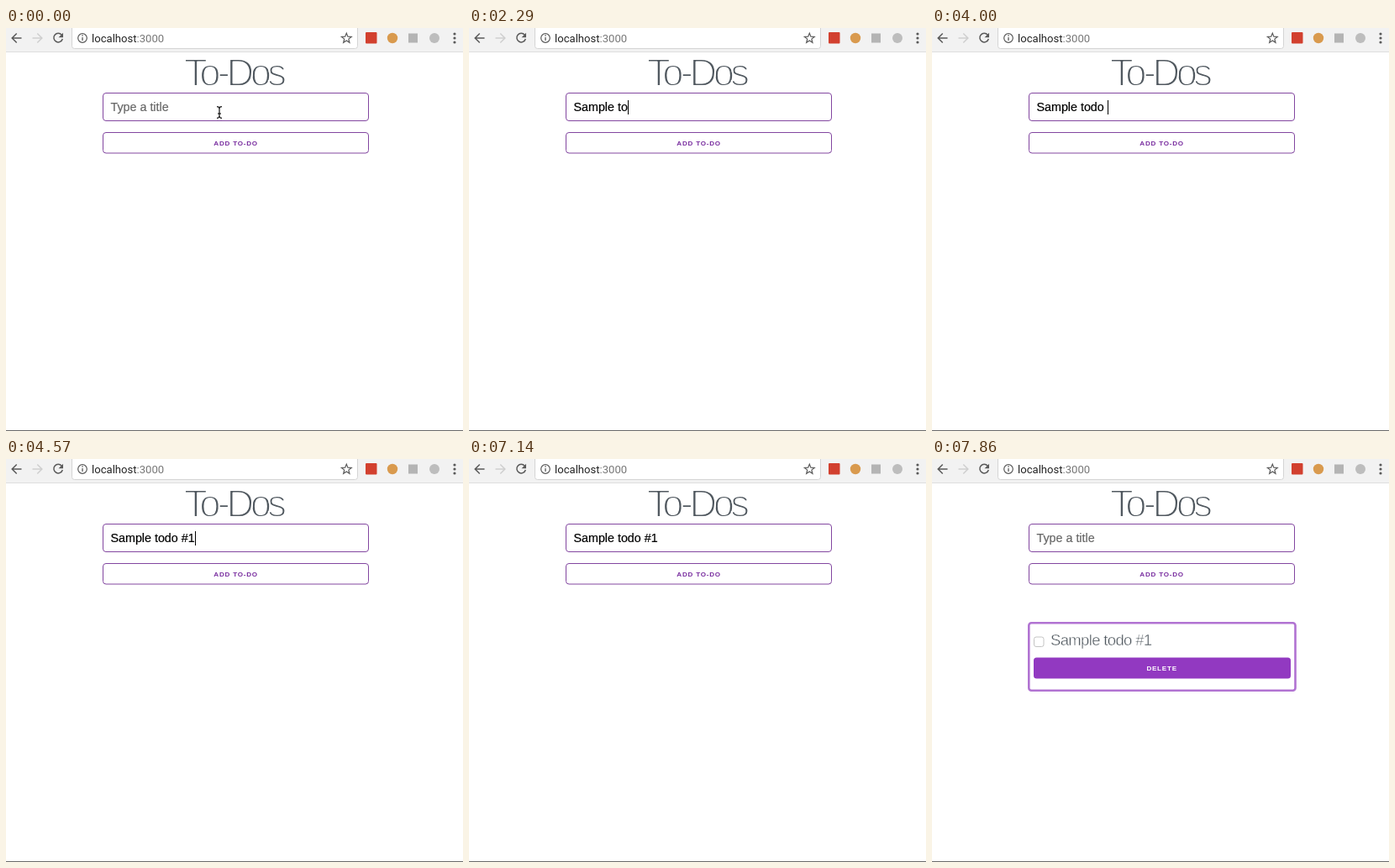
Animation, 544 px wide and 480 px high, one loop 8000 ms. Source, as an HTML page:

```html
<!DOCTYPE html>
<html lang="en">
<head>
<meta charset="utf-8">
<title>To-Dos</title>
<style>
  html, body { margin: 0; width: 100%; height: 100%; overflow: hidden; background: #fff; }
  svg { display: block; width: 544px; height: 480px; }
  text { font-family: "Liberation Sans", Arial, sans-serif; white-space: pre; }
  .icon { fill: none; stroke: #5a5a5a; stroke-width: 1.5; }
  .box { fill: #fff; stroke: #8246a0; }
  .field { font-size: 14.3px; stroke-width: .2; }
  .label { font-size: 8.1px; font-weight: bold; letter-spacing: .75px; fill: #7a2fa0; text-anchor: middle; }
  /* The white outline trims the regular weight down to a light one. */
  .light { fill: #50585f; stroke: #fff; stroke-linejoin: round; }
</style>
</head>
<body>
<svg viewBox="0 0 544 480">
  <rect width="544" height="480" fill="#fff"/>

  <g id="toolbar">
    <rect width="544" height="28" fill="#f2f2f2"/>
    <path d="M0 28.5H544" stroke="#dedede"/>
    <rect x="78.5" y="-6.5" width="340" height="31" rx="3" fill="#fff" stroke="#d4d4d4"/>
    <path class="icon" d="M18.5 12H7.5M12.7 6.5L7.2 12l5.5 5.5"/>
    <path class="icon" style="stroke:#cfcfcf" d="M31.5 12h11M37.3 6.5l5.5 5.5-5.5 5.5"/>
    <path class="icon" d="M66.3 8.2A5.3 5.3 0 1 0 67.3 13"/>
    <path d="M68 5.8v5.4h-5.4z" fill="#5a5a5a"/>
    <circle class="icon" cx="91" cy="12" r="5.3" style="stroke-width:1.2"/>
    <path class="icon" d="M91 11v4M91 8.3v1.5" style="stroke-width:1.3"/>
    <text x="102" y="16.6" font-size="13.1" fill="#222" style="font-family:Roboto,sans-serif">localhost<tspan fill="#777">:3000</tspan></text>
    <path id="star" class="icon" style="stroke-width:1.2"/>
    <rect x="428" y="5" width="13.5" height="13.5" rx="1" fill="#d2402f"/>
    <circle cx="460" cy="12" r="6.2" fill="#d99a4e"/>
    <rect x="479" y="6.5" width="11" height="11" fill="#b4b4b4"/>
    <circle cx="510" cy="12" r="6" fill="#bdbdbd"/>
    <g fill="#5a5a5a">
      <circle cx="534" cy="7" r="1.6"/><circle cx="534" cy="12" r="1.6"/><circle cx="534" cy="17" r="1.6"/>
    </g>
  </g>

  <text class="light" x="212" y="69" font-size="45.5" letter-spacing="-4.6" stroke-width="1.9">To<tspan dx="1">-Dos</tspan></text>

  <rect class="box" x="115.5" y="77.5" width="316" height="33" rx="3.5"/>
  <text id="placeholder" class="field" x="124.5" y="99" fill="#666" stroke="#666">Type a title</text>
  <text id="typed" class="field" x="124.5" y="99" stroke="#000"></text>
  <path id="caret" d="M.5 86v17" stroke="#000"/>
  <g id="pointer" fill="none" stroke="#222" stroke-width="1.3">
    <path d="M251 93.7q3 0 3 2.5v8.6q0 2.5-3 2.5M257 93.7q-3 0-3 2.5v8.6q0 2.5 3 2.5M252.2 102h3.6"/>
  </g>

  <rect class="box" x="115.5" y="124.5" width="316" height="24.5" rx="3.5"/>
  <text class="label" x="273.6" y="140.4">ADD TO-DO</text>

  <g id="card">
    <rect x="115.3" y="195.3" width="317.2" height="80.4" rx="3" fill="#fff" stroke="#b173d2" stroke-width="2.6"/>
    <rect x="121.5" y="212" width="11.5" height="11.5" rx="2.5" fill="#fff" stroke="#c4c4c4"/>
    <text class="light" x="141" y="222" font-size="18.5" letter-spacing="-.65" stroke-width=".45">Sample todo #1</text>
    <rect x="121" y="236.5" width="306" height="25" rx="3.5" fill="#9239c1"/>
    <text class="label" x="273.6" y="252.4" style="fill:#fff">DELETE</text>
  </g>

  <path d="M0 479.5H544" stroke="#6a6a6a"/>
</svg>
<script>
  const LOOP = 8000, POINTER_HIDES = 570, SUBMITTED = 7290;
  const TITLE = "Sample todo #1";

  // [time, characters typed, caret visible]
  const steps = [
    [0, 0, false], [290, 0, true],
    [570, 1, true], [710, 2, true], [1000, 3, true], [1140, 4, true],
    [1290, 5, true], [1430, 6, true], [1570, 7, true], [2000, 7, false],
    [2140, 8, true], [2290, 9, true], [2430, 10, true], [2570, 11, true],
    [3000, 12, true], [3570, 12, false], [4000, 12, true],
    [4290, 13, true], [4570, 14, true],
    [5000, 14, false], [5570, 14, true], [6000, 14, false],
    [6570, 14, true], [7000, 14, false],
    [SUBMITTED, 0, true], [7710, 0, false]
  ];

  const get = id => document.getElementById(id);
  const [placeholder, typed, caret, pointer, card] =
    ["placeholder", "typed", "caret", "pointer", "card"].map(get);
  const show = (node, visible) => node.setAttribute("visibility", visible ? "visible" : "hidden");

  const starPoints = Array.from({ length: 10 }, (_, i) => {
    const radius = i % 2 ? 2.7 : 6.2, angle = i * Math.PI / 5;
    return [405.3 + radius * Math.sin(angle), 12.3 - radius * Math.cos(angle)];
  });
  get("star").setAttribute("d", `M${starPoints.join("L")}Z`);

  function draw(time) {
    const [, count, caretOn] = steps.findLast(step => step[0] <= time);
    typed.textContent = TITLE.slice(0, count);
    show(placeholder, count === 0);
    show(caret, caretOn);
    const width = count ? typed.getComputedTextLength() : 0;
    caret.setAttribute("transform", `translate(${Math.round(124.8 + width)})`);
    show(pointer, time < POINTER_HIDES);
    show(card, time >= SUBMITTED);
  }

  const start = performance.now();
  function tick() {
    draw((performance.now() - start) % LOOP);
    requestAnimationFrame(tick);
  }
  tick();
</script>
</body>
</html>
```
